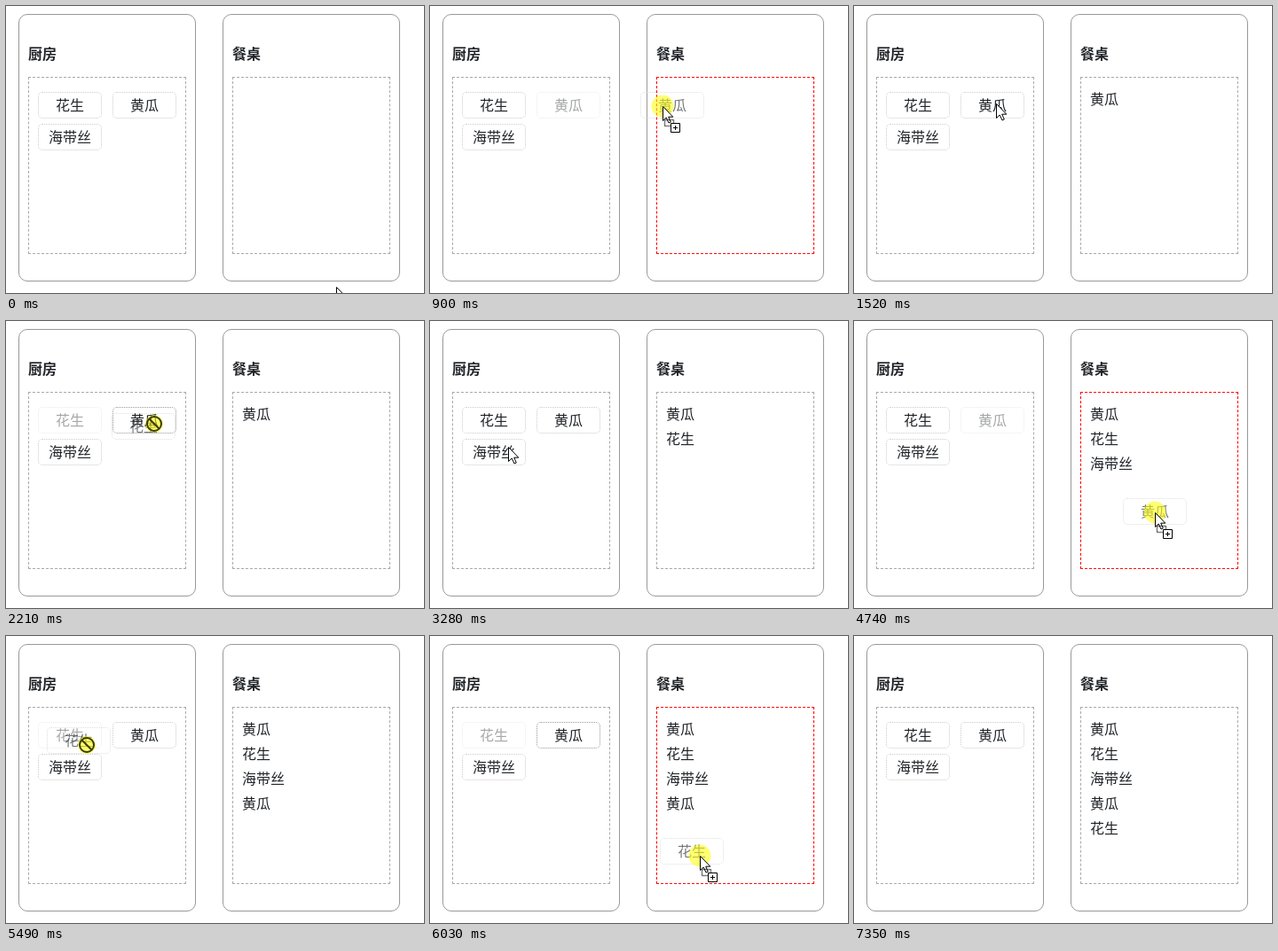
Animation of 471 by 324 pixels, one loop 7.66 s. Source, as an HTML page:

```html
<!DOCTYPE html>
<html lang="zh">
<head>
<meta charset="utf-8">
<style>
html, body { margin: 0; width: 100%; height: 100%; overflow: hidden; background: #fff; }
body { position: relative; color: #212529; font: 16px "Noto Sans CJK SC", "Noto Sans CJK", sans-serif; }
div, svg { position: absolute; box-sizing: border-box; white-space: nowrap; }
.card { top: 9px; width: 200px; height: 302px; border: 1px solid #999; border-radius: 10px; }
.title { left: 10px; top: 29px; font-weight: bold; line-height: 28px; }
.zone { left: 10px; top: 70px; width: 178px; height: 200px; border: 1px dashed #a9a9a9; }
.zone.over { border-color: #f00; }
.item { width: 72px; height: 30px; border: 1px dotted #ccc; border-radius: 5px; text-align: center; line-height: 26px; }
.item.dark { border-color: #999; }
#list { left: 266px; top: 90px; line-height: 28px; white-space: pre; }
#ghost { opacity: .62; }
svg { left: 0; top: 0; width: 100%; height: 100%; overflow: hidden; }
</style>
</head>
<body>
<div class="card" style="left:14px"><div class="title">厨房</div><div class="zone"></div></div>
<div class="card" style="left:244px"><div class="title">餐桌</div><div class="zone" id="table"></div></div>
<div id="list"></div>
<div class="item" id="ghost"></div>
<svg>
  <g id="cursor">
    <circle id="glow" fill="#ff0" opacity=".55"/>
    <g id="ban" fill="none" stroke="#3c3c00" stroke-width="2">
      <circle r="8"/><path d="M-5.5-5.5 5.5 5.5"/>
    </g>
    <path id="arrow" d="M.5.5V16.5L4.2 13 7 19 9.3 18 6.7 12.2H11.8Z" fill="#fff" stroke="#000"/>
    <g id="copy" fill="none" stroke="#000">
      <path d="M2.5 15.5h10v7h-10z" stroke-dasharray="1 1" stroke-width="1.5"/>
      <path d="M9.5 19.5h10v10h-10z" fill="#fff"/>
      <path d="M12 24.5h5M14.5 22v5"/>
    </g>
  </g>
</svg>
<script>
const LOOP = 7660, TICK = 76.5;
const $ = id => document.getElementById(id);
const foods = ['花生', '黄瓜', '海带丝'];
const spot = i => [36 + 84 * (i % 2), 97 + 36 * (i >> 1)];

// press, land and drop are ticks; grab is the point held inside the food
const drags = [
  { food: 1, grab: [25, 16], press: 9, land: 14, drop: 15, to: [325, 113] },
  { food: 0, grab: [48, 12], press: 25, land: 34, drop: 35, to: [283, 126] },
  { food: 2, grab: [52, 9], press: 44, land: 48, drop: 49, to: [310, 190] },
  { food: 1, grab: [36, 16], press: 57, land: 63, drop: 64, to: [354, 224] },
  { food: 0, grab: [45, 20], press: 71, land: 79, drop: 83, to: [304, 248] }
];

// The pointer eases from stop to stop: reach a food, carry it, let go, leave
const stops = [{ at: 0, p: [372, 317] }];
const stay = (from, until, p) => stops.push({ at: from, p }, { at: until, p });
for (const d of drags) {
  const [x, y] = spot(d.food);
  stay(d.press - 2, d.press, [x + d.grab[0], y + d.grab[1]]);
  stay(d.land, d.drop, d.to);
}
stay(88, 91, [369, 185]);
stay(96, 101, [440, 330]);

const ease = k => k * k * (3 - 2 * k);

function pointer(n) {
  const i = stops.findIndex(s => s.at > n), a = stops[i - 1], b = stops[i];
  const k = ease((n - a.at) / (b.at - a.at));
  return a.p.map((v, j) => Math.round(v + (b.p[j] - v) * k));
}

const place = (el, x, y) => { el.style.left = x + 'px'; el.style.top = y + 'px'; };
const show = (el, on) => { el.style.display = on ? '' : 'none'; };

const items = foods.map((name, i) => {
  const el = document.createElement('div');
  el.className = 'item';
  el.textContent = name;
  place(el, ...spot(i));
  document.body.insertBefore(el, $('list'));
  return el;
});

function draw(now) {
  const n = Math.floor((now % LOOP + 20) / TICK);
  const [x, y] = pointer(n);
  const held = drags.find(d => n >= d.press && n < d.drop);
  const moving = !!held && n > held.press;
  const dragged = moving ? held.food : -1;
  const over = moving && x >= 255 && x < 433 && y > 80 && y < 280;

  items.forEach((el, i) => { el.style.opacity = i === dragged ? .4 : 1; });
  items[1].classList.toggle('dark', dragged === 0 && x > 120);
  $('table').classList.toggle('over', over);
  $('list').textContent = drags.filter(d => n >= d.drop).map(d => foods[d.food]).join('\n');

  show($('ghost'), moving);
  if (moving) {
    $('ghost').textContent = foods[dragged];
    place($('ghost'), x - held.grab[0], y - held.grab[1]);
  }
  $('cursor').setAttribute('transform', `translate(${x} ${y})`);
  $('glow').setAttribute('r', !held ? 0 : moving && !over ? 10 : 12.5);
  show($('ban'), moving && !over);
  show($('arrow'), !moving || over);
  show($('copy'), over);
}

const start = performance.now();
(function loop() {
  draw(performance.now() - start);
  requestAnimationFrame(loop);
})();
</script>
</body>
</html>
```
